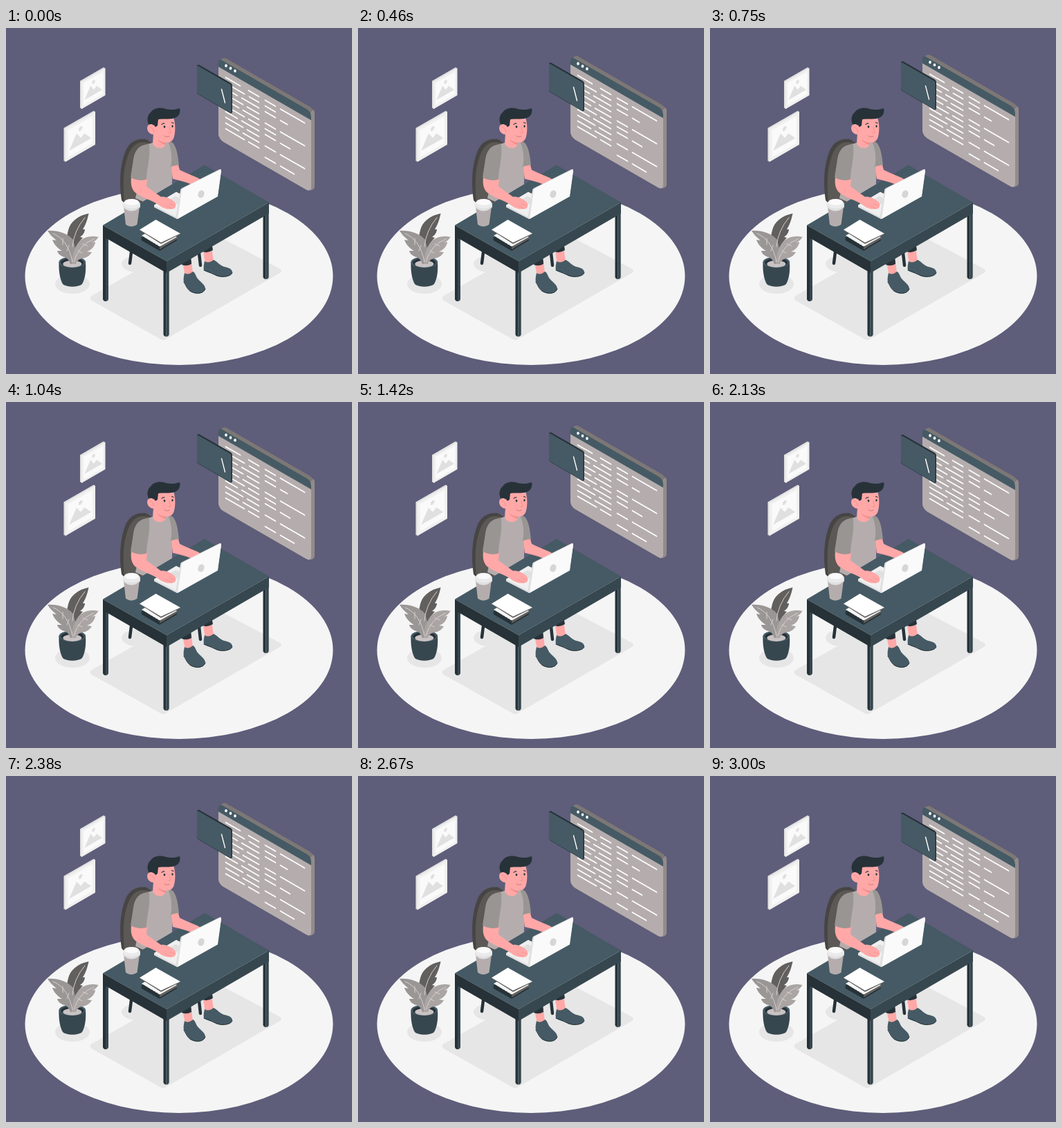
Write an HTML page that moves like this. It is 500 by 500 pixels and loops after 3040 ms.

```html
<!DOCTYPE html>
<html lang="en">
<head>
<meta charset="utf-8">
<title>Working at a desk</title>
<style>
  html, body { margin: 0; width: 100%; height: 100%; overflow: hidden; background: #5e5d7a; }
  svg { display: block; width: 100%; height: 100%; }
  .skin { fill: #ffa8a7; }
  .slate { fill: #455a64; }
  .deep { fill: #37474f; }
  .ink { fill: #263238; }
  .shirt { fill: #b5adad; }
  .sleeve { fill: #999593; }
  .shade { fill: #e6e6e6; }
  .line { fill: none; stroke-linecap: round; stroke-linejoin: round; }
</style>
</head>
<body>
<svg viewBox="0 0 500 500">
  <ellipse cx="250" cy="358.600" rx="222.500" ry="128.400" fill="#f5f5f5"/>
  <g class="shade">
    <path d="M124 387 290 292 396 348Q400 351 396 354L232 449Q227 453 222 449L124 394Q119 390 124 387Z"/>
    <ellipse cx="190" cy="341" rx="23" ry="12"/>
    <ellipse cx="96" cy="370" rx="25" ry="14"/>
  </g>

  <g id="pictures"></g>

  <g id="plant">
    <path class="deep" d="M76.500 338C76 352 78 363 82 370C88 375 104 375 110 370C114 363 116 352 115 338Z"/>
    <ellipse class="slate" cx="95.800" cy="338.500" rx="19.300" ry="8"/>
    <ellipse class="ink" cx="95.800" cy="339" rx="16.500" ry="6.500"/>
    <ellipse cx="95.800" cy="341" rx="13.500" ry="5" fill="#c9c3c3"/>
    <path d="M119.500 268C104 271 93 280 90 292L88 301 92 305C90 310 92 320 96 326C101 316 106 308 111 303L107 302C112 299 114 294 114 291L111 291C116 283 118 275 119.500 268Z" fill="#62605f"/>
    <path d="M60 293C73 292 88 296 97 306L100 318 98 341 93 341C91 335 88 332 84 331C78 329 75 326 74 322L81 322C74 318 69 312 67 306L73 307C68 303 63 298 60 293Z" fill="#9a9695"/>
    <path d="M133.500 302C121 299 110 303 104 311C99 318 95 328 95 341L101 341C102 337 105 334 110 333C117 332 121 329 124 324L117 323C124 321 129 314 129 309L124 310C129 308 131 306 133.500 302Z" fill="#aaa4a3"/>
    <path class="line" d="M68 297Q90 306 96 338M127 305Q105 313 98 338M114 274Q98 293 96 316M82 304 82 313M91 314 88 322M111 312 118 315M104 322 110 325" stroke="#d6d0d0" stroke-width="1"/>
  </g>

  <g id="chair">
    <path class="line" d="M182 316 179 340M278 316 281 343" stroke="#263238" stroke-width="4.500"/>
    <path d="M167 249C163 222 165 196 173 177C179 164 190 159 203 161L216 170 205 254 174 256Z" fill="#474543"/>
    <path d="M171 251C168 220 170 196 179 178C185 167 194 163 206 166L216 174 205 254Z" fill="#5b5856"/>
  </g>

  <g id="legs">
    <path class="skin" d="M255 338 268 336 270 355 259 358ZM284 318 297 315 300 338 288 341Z"/>
    <path class="ink" d="M252 332 267 328 268 341Q261 345 254 342ZM282 314 297 310 299 321Q291 326 284 323Z"/>
    <path class="slate" d="M258 354Q263 358 270 352C273 353 274 357 276 361C280 367 288 370 288 377C286 384 276 385 269 382C262 379 261 372 257 367C256 363 257 358 258 354Z"/>
    <path class="slate" d="M287 337Q293 341 300 335C306 338 309 343 315 345C322 346 328 349 327 354C323 360 311 361 304 358C298 353 291 354 286 350C285 346 286 341 287 337Z"/>
    <path class="line" d="M257 367C261 374 263 380 270 382C278 385 286 383 288 377M286 350C294 353 300 356 305 358C314 361 325 359 327 354" stroke="#263238" stroke-width="1"/>
  </g>

  <g id="torso">
    <path class="shirt" d="M204 168 215 165Q226 173 234 163L242 167C246 184 240 201 240 229L205 254 187 246Z"/>
    <path class="sleeve" d="M234 163C245 164 248 178 250 198Q244 203 238 201Q242 182 234 163Z"/>
  </g>

  <g id="desk">
    <path class="ink" d="M140 294H144V395Q141 395 140 392ZM227.500 348H231.500V446Q228.500 446 227.500 443ZM371.500 264H375.500V363Q372.500 363 371.500 360Z"/>
    <path class="deep" d="M144 294H148V392Q147 395 144 395ZM231.500 345H235.700V443Q235 446 231.500 446ZM375.500 258H379.700V360Q379 363 375.500 363Z"/>
    <path class="slate" d="M140 285 287 198 380 252 232 337Z"/>
    <path class="ink" d="M140 285 232 337V354L140 301Z"/>
    <path class="deep" d="M232 337 380 252V268L232 354Z"/>
  </g>

  <g id="cup">
    <path class="shirt" d="M170 258 173 284Q181 290 189.500 284L193 258Z"/>
    <path d="M169 254V259Q181 270 194 259V254Z" fill="#e0e0e0"/>
    <ellipse cx="181.500" cy="254.500" rx="12.500" ry="6.500" fill="#ebebeb"/>
    <ellipse cx="181.500" cy="251.500" rx="10.500" ry="4.500" fill="#fafafa"/>
  </g>

  <g id="notebook">
    <path class="ink" d="M196 302 221 288 247 304V307L222 322 196 307Z"/>
    <path d="M222 316 247 302V305L222 320Z" fill="#62605e"/>
    <path d="M196 300 220 286 247 302 222 316Z" fill="#f5f5f5"/>
    <path d="M194 293 217 279 252 298 224 312Z" fill="#62605e"/>
    <path d="M193 291.500 216.500 277 252 297 224 310Z" fill="#fff"/>
    <g id="rings"></g>
  </g>

  <g id="laptop">
    <path d="M214 256 246 237 278 253 247 276 214 259Z" fill="#e0e0e0"/>
    <path d="M214 256 246 237 278 253 246 273Z" fill="#f0f0f0"/>
    <path d="M224 255 245 243 256 249 237 262Z" fill="#e0e0e0"/>
  </g>

  <g id="arms">
    <path class="skin" d="M239 200 249 198 251 205C261 210 270 213 278 217L287 223 284 228 268 226C258 222 249 220 241 218Z"/>
    <path class="skin" d="M181 216C180 224 181 233 187 238C198 246 211 249 221 256C227 261 235 263 243 261Q247 257 244 252C239 247 231 243 224 244L203 229 204 217Z"/>
    <path class="line" d="M236 254 244 257M230 256 240 261" stroke="#f08c8e" stroke-width=".6"/>
    <path class="sleeve" d="M207 168C193 168 186 176 184 190L180 216Q191 222 203 219C203 203 209 188 207 168Z"/>
  </g>

  <g id="lid">
    <path d="M252 235Q252 232 255 231L308 204.500Q311 203 311 206L305.500 243 247 276 245 274Z" fill="#e0e0e0"/>
    <path d="M254 235Q254 232 257 231L309 205Q311.500 204 311 207L306 243.500 248 276Z" fill="#fafafa"/>
    <ellipse cx="282" cy="240" rx="4.500" ry="5.700" fill="#d6d6d6" transform="rotate(20 282 240)"/>
  </g>

  <g id="head">
    <path class="skin" d="M213 152 212 167C217 176 228 175 231 168L230 160Z"/>
    <path d="M218 160Q224 165 231 165V169Q223 168 218 160Z" fill="#f28f8f"/>
    <path class="skin" d="M214 136C222 129 235 126 242 129C245 138 245 149 243 157C241 165 234 167 227 165C220 163 215 159 213 152Z"/>
    <path class="ink" d="M207 141C203 134 204 126 209 122C213 116 222 114 231 117C239 119 245 118 251 116C253 124 248 130 240 131C233 132 226 131 220 132L219 141 215 144Z"/>
    <path class="skin" d="M217 145C215 139 208 137 205 141C202 146 206 154 214 154Z"/>
    <path class="line" d="M208 143Q213 144 214 150" stroke="#f28f8f" stroke-width=".8"/>
    <ellipse class="ink" cx="229" cy="142.700" rx="1.300" ry="1.700"/>
    <ellipse class="ink" cx="240.500" cy="142" rx="1.200" ry="1.700"/>
    <path class="line" d="M225 139.500Q226.500 137.500 229 138M239.500 136.500 242 137.500" stroke="#263238" stroke-width="1.100"/>
    <path class="line" d="M236 143 238 151 234.500 151.500" stroke="#f28f8f" stroke-width=".9"/>
    <path class="line" d="M229 156Q232 158.500 236 156.500" stroke="#b5686b" stroke-width=".7"/>
  </g>

  <g id="screen">
    <g id="depth" fill="#7d7775"></g>
    <path d="M440 122 444.500 118Q446 120 446 124V229Q446 232 444 233L440 235Z" fill="#938b89"/>
    <g transform="matrix(1 .577 0 1 307 43.400)">
      <rect width="134" height="117" rx="7" fill="#b5adad"/>
      <path class="slate" d="M0 12.500V7Q0 0 7 0H127Q134 0 134 7V12.500Z"/>
      <g id="text" stroke="#fff" stroke-width="2" stroke-linecap="round"></g>
    </g>
    <g fill="#fff">
      <ellipse cx="318" cy="54.500" rx="1.800" ry="2.200"/>
      <ellipse cx="324.500" cy="58.300" rx="1.800" ry="2.200"/>
      <ellipse cx="331" cy="62" rx="1.800" ry="2.200"/>
    </g>
    <path class="ink" d="M276 55Q276 53 278.500 53L325 79.500Q327 81 327 83V121Q327 124 324 123L278 96Q276 95 276 92Z"/>
    <path class="slate" d="M276 56Q276 54 278 55L324 81.500Q325.500 82.500 325.500 84V120.500Q325.500 123 323.500 122L278 95.500Q276 94.500 276 92Z"/>
    <path class="line" d="M311.500 88.500 316.500 108" stroke="#fff" stroke-width="1.400"/>
  </g>
</svg>
<script>
  const LOOP = 3040;
  const LIFT = 10;
  const byId = id => document.getElementById(id);
  const repeat = (count, make) => Array.from({ length: count }, (_, i) => make(i)).join("");

  const picture = (x, y, w, h) => {
    const wall = (dx, dy) => `matrix(${w} ${-w * 0.577} 0 ${h} ${x + dx} ${y + dy})`;
    return `
    <rect width="1" height="1" fill="#e0e0e0" transform="${wall(0, 0)}"/>
    <rect width="1" height="1" fill="#e0e0e0" transform="${wall(1, 0.6)}"/>
    <g transform="${wall(2, 1.2)}">
      <rect width="1" height="1" fill="#f0f0f0"/>
      <rect x=".09" y=".09" width=".82" height=".82" fill="#fafafa"/>
      <path d="M.13 .73 .38 .34 .52 .55 .64 .47 .87 .73Z" fill="#e0e0e0"/>
      <ellipse cx=".51" cy=".26" rx=".065" ry=".065" fill="#e0e0e0"/>
    </g>`;
  };
  byId("pictures").innerHTML = picture(107, 76.5, 34.5, 39.5) + picture(83.5, 144.5, 43.5, 48);

  byId("rings").innerHTML = repeat(7, i =>
    `<path class="line" d="M${200 + i * 3.8} ${303 + i * 2.2}q-4 -1 -4 2t3 2" stroke="#263238" stroke-width="1"/>`);

  byId("depth").innerHTML = repeat(6, i =>
    `<rect width="134" height="117" rx="7" transform="matrix(1 .577 0 1 ${307 + i} ${43.4 - i * 0.6})"/>`);

  // Each row lists the start and end of its strokes along the screen.
  const rows = [
    [10, 32, 43, 59, 67, 83, 89, 125],
    [10, 38, 44, 59, 67, 83],
    [10, 28, 33, 59, 67, 83, 89, 100],
    [10, 36, 41, 59],
    [10, 30, 35, 59, 67, 83, 89, 125],
    [10, 38, 43, 59, 67, 83],
    [10, 28, 33, 59, 67, 83, 89, 104],
    [10, 36, 41, 59],
    [10, 30, 35, 59, 67, 83, 89, 125],
    [10, 38, 43, 59],
    [67, 83, 89, 110]
  ];
  byId("text").innerHTML = rows.map((row, i) => {
    const y = 22 + i * 8.25;
    let d = "";
    for (let k = 0; k < row.length; k += 2) d += `M${row[k] + 0.7} ${y}H${row[k + 1] - 0.7}`;
    return `<path d="${d}"/>`;
  }).join("");

  const screen = byId("screen");
  function draw(now) {
    const phase = (now % LOOP) / LOOP;
    const rise = 1 - Math.abs(1 - 2 * phase);
    screen.setAttribute("transform", `translate(0 ${-LIFT * rise})`);
    requestAnimationFrame(draw);
  }
  draw(performance.now());
</script>
</body>
</html>
```
